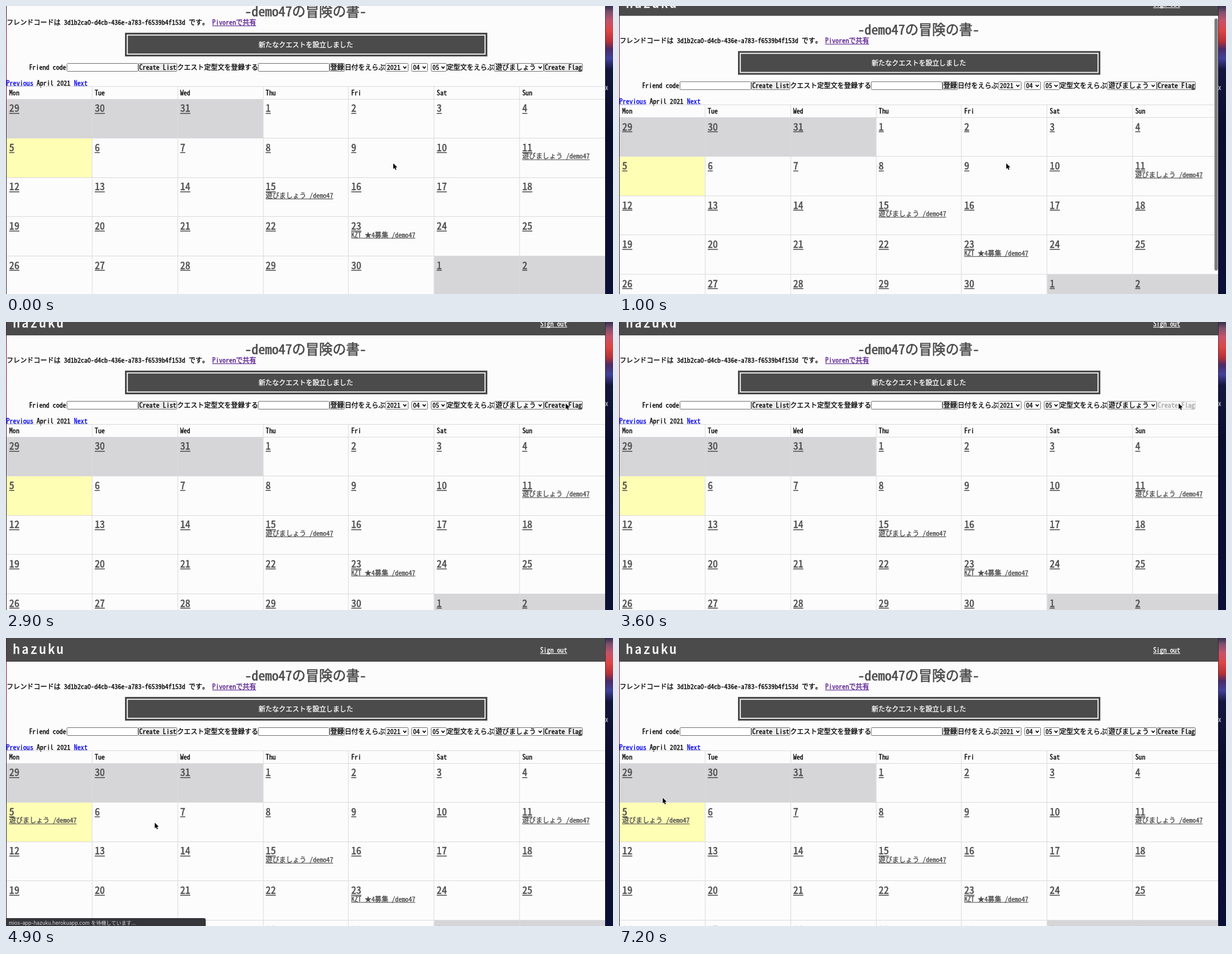
Animation of 1000 by 474 pixels, one loop 7.3 s. Source, as an HTML page with a canvas:

```html
<!DOCTYPE html>
<html lang="ja">
<head>
<meta charset="utf-8">
<title>Quest calendar</title>
<style>
html, body { margin: 0; width: 100%; height: 100%; overflow: hidden; background: #fdfcfd; }
canvas { display: block; width: 1000px; height: 474px; }
</style>
</head>
<body>
<canvas id="stage" width="1000" height="474"></canvas>
<script>
const ctx = document.getElementById('stage').getContext('2d');
const LOOP = 7300, STEP = 100;
const W = 1000, H = 474, LEFT = 1, RIGHT = 987;
const MONO = '"Noto Sans Mono CJK JP", "Noto Sans CJK JP", "Noto Sans Mono", monospace';
const EM = 11.12;
const DARK = '#4b4b4b', PAPER = '#fdfcfd', BLUE = '#0000ee', PURPLE = '#551a8b', GRAY = '#d6d5d7';
const USER = 'demo47', SITE = 'hazuku';

// [time, value...] with eased moves in between
const scrollKeys = [[0, 53], [500, 53], [800, 34.5], [1100, 17], [4500, 17]];
const cursorKeys = [
  [0, 638, 259], [1000, 638, 259], [1700, 898, 160], [2200, 898, 160], [2800, 922, 134],
  [3700, 922, 134], [4400, 245, 304], [4900, 245, 304], [5700, 9, 294],
  [6300, 9, 294], [7000, 72, 263]
];
const CLICK = 3500, WAIT = 4100, RELOAD = 4600, DONE = 5000;

function at(keys, t, ease) {
  const i = keys.findIndex(k => k[0] > t);
  if (i < 0) return keys[keys.length - 1].slice(1);
  const a = keys[i - 1], b = keys[i];
  let p = (t - a[0]) / (b[0] - a[0]);
  if (ease) p = p * p * (3 - 2 * p);
  return a.slice(1).map((v, j) => v + (b[j + 1] - v) * p);
}

function box(x, y, w, h, fill) {
  ctx.fillStyle = fill;
  ctx.fillRect(x, y, w, h);
}

// y is the middle of the digits; returns the end of the text
function text(s, x, y, { size = EM, color = '#000', line = false, gap = 0, align = 'left' } = {}) {
  ctx.font = `${size}px ${MONO}`;
  ctx.letterSpacing = gap + 'px';
  ctx.textAlign = align;
  ctx.fillStyle = ctx.strokeStyle = color;
  ctx.lineWidth = size * 0.026;
  const base = y + size * 0.365;
  ctx.fillText(s, x, base);
  ctx.strokeText(s, x, base);
  const w = ctx.measureText(s).width;
  ctx.letterSpacing = '0px';
  if (line) box(x, base + size * 0.1, w, Math.max(1, size * 0.085), color);
  return x + w;
}

function frame(x, y, w, h, fill, edge) {
  ctx.beginPath();
  ctx.roundRect(x + 0.5, y + 0.5, w - 1, h - 1, 1);
  ctx.fillStyle = fill;
  ctx.fill();
  ctx.strokeStyle = edge;
  ctx.lineWidth = 1;
  ctx.stroke();
}

function field(x, y) {
  frame(x, y - 7, 118, 14, '#fff', '#777');
}

function button(s, x, y, w, off) {
  frame(x, y - 7, w, 14, off ? '#f7f7f7' : '#ededed', off ? '#d0d0d0' : '#777');
  text(s, x + w / 2, y, { align: 'center', color: off ? '#a5a5a5' : '#000' });
}

function select(s, x, y, w) {
  frame(x, y - 7, w, 14, '#fff', '#777');
  text(s, x + 2.5, y);
  ctx.beginPath();
  ctx.moveTo(x + w - 8.5, y - 1.5);
  ctx.lineTo(x + w - 6, y + 1.5);
  ctx.lineTo(x + w - 3.5, y - 1.5);
  ctx.strokeStyle = '#000';
  ctx.lineWidth = 1.5;
  ctx.stroke();
}

function wallpaper() {
  const g = ctx.createLinearGradient(975, 0, 966, H);
  [[0, '#38304f'], [10, '#80506f'], [24, '#c4536a'], [40, '#dc4745'], [58, '#b63138'],
   [70, '#4c2c65'], [86, '#41419a'], [104, '#15163c'], [200, '#090d2c'], [H, '#0b1036']]
    .forEach(([y, c]) => g.addColorStop(y / H, c));
  box(RIGHT, 0, W - RIGHT, H, g);
  box(RIGHT, 0, 1, H, 'rgba(20,18,34,.6)');
  text('x', 987, 134, { size: 10, color: '#c8c8d0' });
  const l = ctx.createLinearGradient(0, 0, 0, H);
  [[0, '#2a2438'], [0.1, '#8a2440'], [0.36, '#6d2038'], [0.42, '#3a3545'], [1, '#34323c']]
    .forEach(([p, c]) => l.addColorStop(p, c));
  box(0, 0, LEFT, H, l);
}

function calendar(y, added) {
  const pitch = (RIGHT - LEFT) / 7, rowH = 64.55, top = y + 21.5;
  const colX = c => LEFT + c * pitch, rowY = r => top + r * rowH;
  box(LEFT, top, pitch * 3, rowH, GRAY);
  box(LEFT, rowY(1), pitch, rowH, '#fffeb5');
  box(colX(5), rowY(4), pitch * 2, rowH, GRAY);

  const rule = '#dcdbdd';
  box(LEFT, y, RIGHT - LEFT, 1, rule);
  for (let r = 0; r < 6; r++) box(LEFT, Math.round(rowY(r)) - 1, RIGHT - LEFT, 1, rule);
  for (let c = 1; c < 7; c++) box(Math.round(colX(c)) - 0.5, y, 1, H - y, rule);

  const play = `遊びましょう /${USER}`;
  const events = { 13: play, 17: play, 25: `KZT ★4募集 /${USER}` };
  if (added) events[7] = play;
  ['Mon', 'Tue', 'Wed', 'Thu', 'Fri', 'Sat', 'Sun'].forEach((d, c) => text(d, colX(c) + 4.3, y + 11));
  for (let i = 0; i < 35; i++) {
    const x = colX(i % 7) + 4.3, ty = rowY(Math.floor(i / 7));
    const day = i < 3 ? 29 + i : (i - 3) % 30 + 1;
    text(String(day), x, ty + 14.8, { size: EM * 1.5, color: DARK, line: true });
    if (events[i]) text(events[i], x, ty + 29.3, { color: DARK, line: true });
  }
}

function page(t, scroll) {
  const y = v => v - scroll;
  box(LEFT, 0, RIGHT - LEFT, H, PAPER);
  box(LEFT, y(0), RIGHT - LEFT, 39, DARK);
  text(SITE, 11.5, y(17.6), { size: EM * 2, color: '#fff', gap: 3.3 });
  text('Sign out', 880, y(20), { color: '#fff', line: true });

  text(`-${USER}の冒険の書-`, 493.5, y(62), { size: EM * 2, color: DARK, align: 'center' });
  const x = text('フレンドコードは 3d1b2ca0-d4cb-436e-a783-f6539b4f153d です。 ', 1, y(80));
  text('Pivorenで共有', x, y(80), { color: PURPLE, line: true });

  box(196, y(97), 597, 39, DARK);
  ctx.strokeStyle = '#fff';
  ctx.lineWidth = 1.6;
  ctx.strokeRect(199.8, y(100.8), 589.4, 31.4);
  text('新たなクエストを設立しました', 494, y(116.5), { color: '#fff', align: 'center' });

  const f = y(154);
  text('Friend code', 38, f - 0.5);
  field(100, f);
  button('Create List', 218, f, 64);
  text('クエスト定型文を登録する', 282, f - 0.5);
  field(415, f);
  button('登録', 533, f, 25);
  text('日付をえらぶ', 558, f - 0.5);
  select('2021', 625, f, 38);
  select('04', 668, f, 27);
  select('05', 700, f, 26);
  text('定型文をえらぶ', 726, f - 0.5);
  select('遊びましょう', 804, f, 82);
  button('Create Flag', 886, f, 64, t >= CLICK && t < RELOAD);

  text('Previous', 0.5, y(179.5), { color: BLUE, line: true });
  text('April 2021', 50.5, y(179.5));
  text('Next', 112, y(179.5), { color: BLUE, line: true });
  calendar(y(185), t >= RELOAD);
}

function scrollbar(t, scroll) {
  if (t < 500 || t >= 1500) return;
  ctx.globalAlpha = Math.min(1, (1500 - t) / 200);
  ctx.beginPath();
  ctx.roundRect(981, scroll * 0.9, 5.5, 415, 2.7);
  ctx.fillStyle = '#7d7c7f';
  ctx.fill();
  ctx.globalAlpha = 1;
}

function status() {
  ctx.beginPath();
  ctx.roundRect(0, 461, 329, 16, [0, 3, 0, 0]);
  ctx.fillStyle = '#35363a';
  ctx.fill();
  ctx.font = '8.3px Inter, "Noto Sans CJK JP", sans-serif';
  ctx.textAlign = 'left';
  ctx.fillStyle = '#d5d6d8';
  ctx.fillText(`mios-app-${SITE}.herokuapp.com を待機しています...`, 4.5, 471.5);
}

function cursor(x, y) {
  ctx.save();
  ctx.translate(x, y);
  ctx.beginPath();
  [[0, 0], [0, 9.2], [2.1, 7.3], [3.6, 10.8], [5.2, 10.1], [3.7, 6.7], [6.6, 6.6]]
    .forEach(p => ctx.lineTo(...p));
  ctx.closePath();
  ctx.lineJoin = 'round';
  ctx.lineWidth = 1.6;
  ctx.strokeStyle = '#fff';
  ctx.stroke();
  ctx.fillStyle = '#000';
  ctx.fill();
  ctx.restore();
}

function draw(t) {
  const scroll = t >= RELOAD ? 0 : at(scrollKeys, t)[0];
  ctx.clearRect(0, 0, W, H);
  page(t, scroll);
  wallpaper();
  scrollbar(t, scroll);
  if (t >= WAIT && t < DONE) status();
  cursor(...at(cursorKeys, t, true));
}

const start = performance.now();
function tick() {
  const t = (performance.now() - start) % LOOP;
  draw(Math.floor(t / STEP) * STEP);
  requestAnimationFrame(tick);
}
tick();
</script>
</body>
</html>
```
